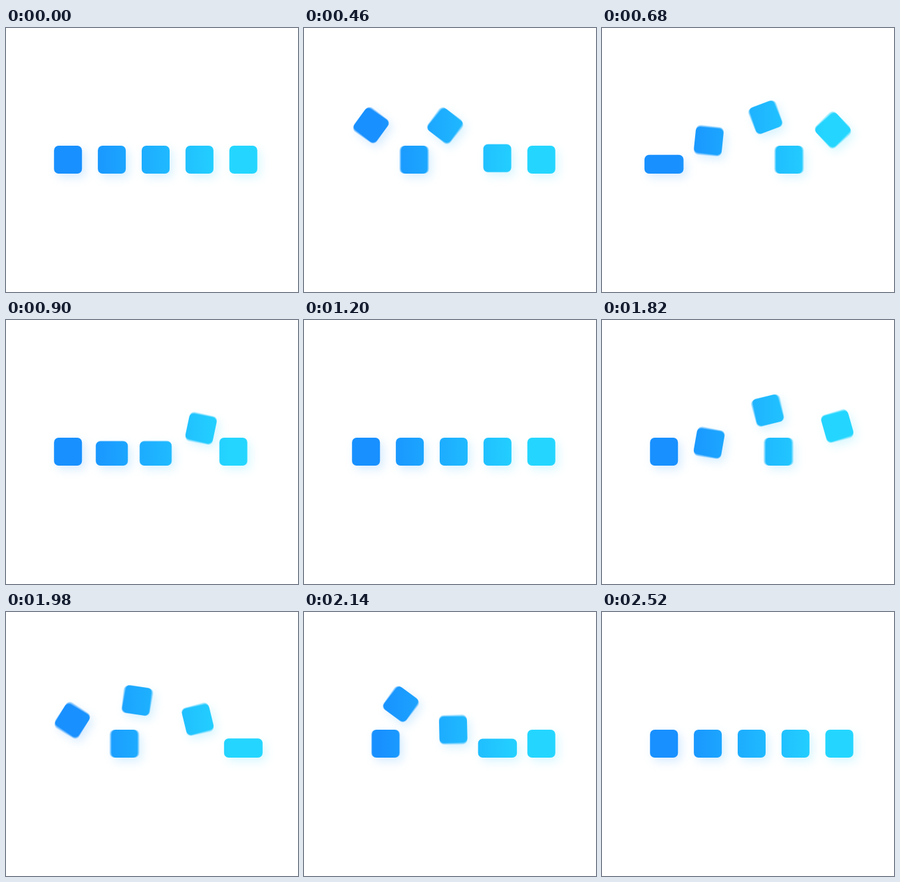
These frames come from a looping animation (439x397 px, 2640 ms). An HTML page with a canvas:

```html
<!DOCTYPE html>
<html lang="en">
<head>
<meta charset="utf-8">
<title>Hopping squares</title>
<style>
  html, body { margin: 0; width: 100%; height: 100%; overflow: hidden; background: #fff; }
  canvas { display: block; }
</style>
</head>
<body>
<canvas id="stage" width="439" height="397"></canvas>
<script>
const W = 439, H = 397;
const HALF = 1320;            // one pass; the next pass is mirrored
const SIZE = 42, RADIUS = 7;
const MID = 225, PITCH = 65.9, FLOOR = 219;
const SLIDE = 1147;           // travel time of the sliding square
const STARTS = [152, 307, 430, 543];
const RISE = 229, HOP = 433, SQUASH = 523, REST = 647;
const PEAK = 65;
const SHUTTER = 8, SAMPLES = 5;

const ctx = document.getElementById('stage').getContext('2d');
const layer = document.createElement('canvas');
layer.width = W;
layer.height = H;
const mask = layer.getContext('2d');

const fill = mask.createLinearGradient(112, 0, 338, 0);
fill.addColorStop(0, '#1890ff');
fill.addColorStop(1, '#24d6ff');

const clamp = v => Math.min(1, Math.max(0, v));
const span = (t, from, to) => clamp((t - from) / (to - from));
const slot = i => MID + (i - 2) * PITCH;

// cubic-bezier(a, 0, b, 1)
function bezier(a, b) {
  return x => {
    if (x <= 0 || x >= 1) return clamp(x);
    let lo = 0, hi = 1, s = 0.5;
    for (let i = 0; i < 22; i++) {
      s = (lo + hi) / 2;
      const r = 1 - s;
      if (3 * r * r * s * a + 3 * r * s * s * b + s * s * s < x) lo = s;
      else hi = s;
    }
    return s * s * (3 - 2 * s);
  };
}

const glide = bezier(0.6, 0.4);
const smooth = bezier(0.42, 0.55);
const fall = bezier(0.42, 1);
const spin = bezier(0.2, 0.8);

function slider(t) {
  return { x: slot(0) + 4 * PITCH * glide(span(t, 0, SLIDE)), lift: 0, turn: 0, squash: 0 };
}

function hopper(i, t) {
  const u = t - STARTS[i];
  return {
    x: slot(i + 1) - PITCH * glide(span(u, 0, HOP)),
    lift: PEAK * (smooth(span(u, 0, RISE)) - fall(span(u, RISE, HOP))),
    turn: -Math.PI * spin(span(u, 30, 402)),
    squash: smooth(span(u, HOP, SQUASH)) - smooth(span(u, SQUASH, REST))
  };
}

function drawSquare(p) {
  const w = SIZE * (1 + 0.4 * p.squash);
  const h = SIZE * (1 - 0.33 * p.squash);
  mask.save();
  mask.translate(p.x, FLOOR - h / 2 - p.lift);
  mask.rotate(p.turn);
  mask.beginPath();
  mask.roundRect(-w / 2, -h / 2, w, h, RADIUS);
  mask.fill();
  mask.restore();
}

function drawMask(t, mirrored) {
  mask.globalCompositeOperation = 'source-over';
  mask.clearRect(0, 0, W, H);
  mask.save();
  if (mirrored) {
    mask.translate(2 * MID, 0);
    mask.scale(-1, 1);
  }
  // Averaging a few moments gives the motion blur
  mask.globalCompositeOperation = 'lighter';
  mask.globalAlpha = 1 / SAMPLES;
  mask.fillStyle = '#fff';
  for (let n = 0; n < SAMPLES; n++) {
    const at = t + ((n + 0.5) / SAMPLES - 0.5) * SHUTTER;
    drawSquare(slider(at));
    STARTS.forEach((_, i) => drawSquare(hopper(i, at)));
  }
  mask.restore();
  mask.globalCompositeOperation = 'source-in';
  mask.fillStyle = fill;
  mask.fillRect(0, 0, W, H);
}

function render(time) {
  const t = time % (2 * HALF);
  drawMask(t % HALF, t >= HALF);

  ctx.fillStyle = '#fff';
  ctx.fillRect(0, 0, W, H);
  ctx.save();
  ctx.filter = 'blur(7px)';
  ctx.globalAlpha = 0.17;
  ctx.drawImage(layer, 5, 6);
  ctx.restore();
  ctx.drawImage(layer, 0, 0);
}

let origin = null;
function tick(now) {
  if (origin === null) origin = now;
  render(now - origin);
  requestAnimationFrame(tick);
}
render(0);
requestAnimationFrame(tick);
</script>
</body>
</html>
```
